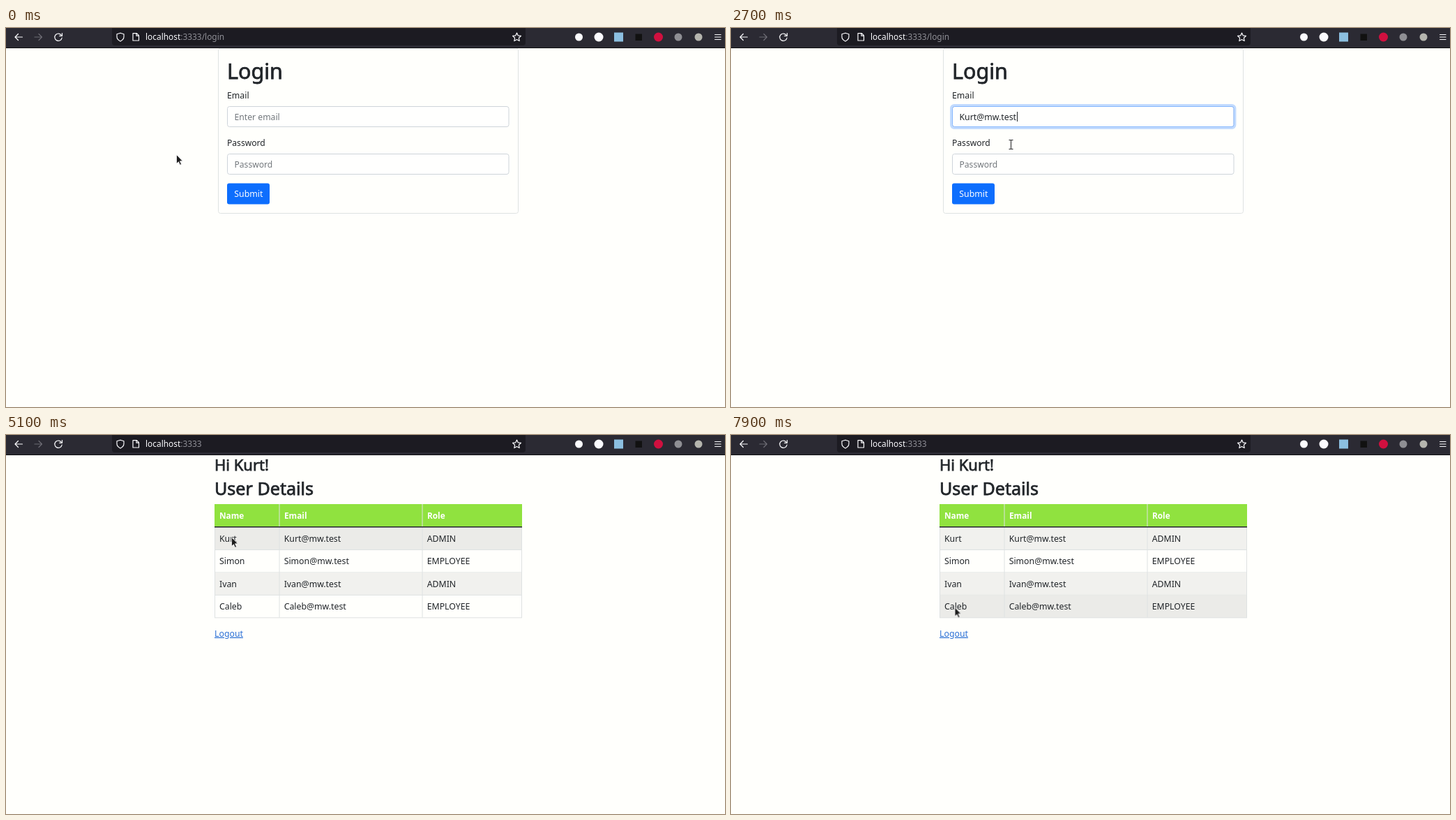
Recreate the animation shown at these times as an HTML page. Size 1031x543 px, loop 8 s.

```html
<!DOCTYPE html>
<html lang="en">
<head>
<meta charset="utf-8">
<title>Login demo</title>
<style>
html, body { margin: 0; width: 100%; height: 100%; overflow: hidden; background: #fffffc; }
svg { display: block; width: 1031px; height: 543px; font: 12.3px "Noto Sans", "Open Sans", sans-serif; fill: #212529; }
.icon { fill: none; stroke: #fbfbfe; stroke-width: 1.2; stroke-linecap: round; stroke-linejoin: round; }
.heading { stroke: #212529; stroke-width: .75; }
.hint { fill: #72777c; }
.field { fill: #fffffe; stroke: #ced4da; }
.filled { fill: #fdf9c8; stroke: #e4dfb8; }
.ring { fill: none; stroke: #c2dbfe; stroke-width: 3.4; }
.edge { fill: none; stroke: #86b7fe; }
.line { fill: none; stroke: #dee2e2; }
.th { fill: #fff; font-weight: 700; font-size: 11.8px; }
.link { fill: #2b70d6; text-decoration: underline; }

/* One 8 s clock; every change is a hard step. */
.t { opacity: 0; animation: 8s step-end infinite; }
#login, #path { animation-name: login; }
#home { animation-name: home; }
#empty { animation-name: empty; }
#data { animation-name: data; }
#focus { animation-name: focus; }
#menu, #caret1 { animation-name: menu; }
#pick { animation-name: pick; }
#hint1 { animation-name: hint1; }
#email { animation-name: email; }
#caret2 { animation-name: caret2; }
#hint2 { animation-name: hint2; }
#auto1, #auto2 { animation-name: auto; }
#press { animation-name: press; }
#press2 { animation-name: press2; }
#arrow { animation-name: arrow; }
#beam { animation-name: beam; }
#hand { animation-name: hand; }
#row0 { animation-name: row0; }
#row1 { animation-name: row1; }
#row2 { animation-name: row2; }
#row3 { animation-name: row3; }
#pointer { animation: move 8s step-end infinite; }

@keyframes login { 0% { opacity: 1 } 50%, 100% { opacity: 0 } }
@keyframes home { 0% { opacity: 0 } 50%, 100% { opacity: 1 } }
@keyframes empty { 0% { opacity: 1 } 53.75%, 100% { opacity: 0 } }
@keyframes data { 0% { opacity: 0 } 53.75%, 100% { opacity: 1 } }
@keyframes focus { 0% { opacity: 0 } 17.5% { opacity: .5 } 18.75% { opacity: 1 } 48.75%, 100% { opacity: 0 } }
@keyframes menu { 0% { opacity: 0 } 18.75% { opacity: 1 } 33.75%, 100% { opacity: 0 } }
@keyframes pick { 0% { opacity: 0 } 30% { opacity: 1 } 33.75%, 100% { opacity: 0 } }
@keyframes hint1 { 0% { opacity: 1 } 33.75%, 100% { opacity: 0 } }
@keyframes email { 0% { opacity: 0 } 33.75%, 100% { opacity: 1 } }
@keyframes caret2 { 0% { opacity: 0 } 33.75% { opacity: 1 } 36.25%, 100% { opacity: 0 } }
@keyframes hint2 { 0% { opacity: 1 } 36.25%, 100% { opacity: 0 } }
@keyframes auto { 0% { opacity: 0 } 36.25%, 100% { opacity: 1 } }
@keyframes press { 0% { opacity: 0 } 45% { opacity: .5 } 46.25%, 100% { opacity: 1 } }
@keyframes press2 { 0% { opacity: 0 } 48.75%, 100% { opacity: 1 } }
@keyframes arrow { 0% { opacity: 1 } 33.75% { opacity: 0 } 50%, 100% { opacity: 1 } }
@keyframes beam { 0% { opacity: 0 } 33.75% { opacity: 1 } 45%, 100% { opacity: 0 } }
@keyframes hand { 0% { opacity: 0 } 45% { opacity: 1 } 50%, 100% { opacity: 0 } }
@keyframes row0 {
  0%, 66.25%, 71.25%, 82.5%, 95%, 100% { opacity: 0 }
  61.25%, 68.75%, 81.25%, 93.75% { opacity: 1 }
}
@keyframes row1 { 0%, 72.5%, 81.25%, 96.25%, 100% { opacity: 0 } 71.25%, 80%, 95% { opacity: 1 } }
@keyframes row2 { 0%, 73.75%, 80%, 100% { opacity: 0 } 72.5%, 77.5% { opacity: 1 } }
@keyframes row3 { 0%, 75%, 77.5% { opacity: 0 } 73.75%, 76.25%, 96.25%, 100% { opacity: 1 } }
@keyframes move {
  0% { transform: translate(244px, 181px) }
  12.5% { transform: translate(320px, 161px) }
  13.75% { transform: translate(320px, 161px); animation-timing-function: steps(2) }
  16.25% { transform: translate(387.5px, 125.5px) }
  27.5% { transform: translate(387.5px, 125.5px); animation-timing-function: steps(3) }
  31.25% { transform: translate(396px, 166px) }
  33.75% { transform: translate(401.5px, 167px) }
  35% { transform: translate(401.5px, 167px); animation-timing-function: steps(9) }
  46.25% { transform: translate(352px, 234px) }
  52.5% { transform: translate(352px, 234px); animation-timing-function: steps(2) }
  55% { transform: translate(272px, 229px) }
  58.75% { transform: translate(254px, 223px) }
  61.25% { transform: translate(320px, 163px) }
  63.75% { transform: translate(323px, 146px) }
  65% { transform: translate(323px, 146px); animation-timing-function: steps(2) }
  67.5% { transform: translate(326px, 106px); animation-timing-function: steps(6) }
  75% { transform: translate(335.5px, 261px) }
  76.25% { transform: translate(335px, 252px); animation-timing-function: steps(7) }
  85% { transform: translate(337px, 82px) }
  86.25% { transform: translate(337px, 82px); animation-timing-function: steps(2) }
  88.75% { transform: translate(368px, 33px) }
  90% { transform: translate(368px, 33px); animation-timing-function: steps(5) }
  96.25% { transform: translate(331px, 229px) }
  98.75%, 100% { transform: translate(320.5px, 246.5px) }
}
</style>
</head>
<body>
<svg viewBox="0 0 1031 543">
  <g id="login" class="t">
    <rect class="line" x="304.5" y="29" width="430" height="236.5" rx="3"/>
    <text class="heading" x="317" y="73" font-size="30.5">Login</text>
    <text x="317" y="101">Email</text>
    <rect class="field" x="317.5" y="112.5" width="403.5" height="29" rx="3"/>
    <rect id="auto1" class="t filled" x="317.5" y="112.5" width="403.5" height="29" rx="3"/>
    <g id="focus" class="t">
      <rect class="ring" x="315.7" y="110.7" width="407" height="32.6" rx="4.5"/>
      <rect class="edge" x="317.5" y="112.5" width="403.5" height="29" rx="3"/>
    </g>
    <text id="hint1" class="t hint" x="327.5" y="131.5" font-size="12.2">Enter email</text>
    <path id="caret1" class="t" d="M327 120h1v14h-1z"/>
    <text id="email" class="t" x="327.5" y="131.5">Kurt@mw.test</text>
    <path id="caret2" class="t" d="M410 120h1v14h-1z"/>
    <text x="317" y="168.5" font-size="12.1">Password</text>
    <rect class="field" x="317.5" y="180.5" width="403.5" height="29" rx="3"/>
    <text id="hint2" class="t hint" x="327.5" y="199.5" font-size="12.1">Password</text>
    <g id="auto2" class="t">
      <rect class="filled" x="317.5" y="180.5" width="403.5" height="29" rx="3"/>
      <path d="M330.2 195h20" fill="none" stroke="#212529" stroke-width="3.8" stroke-linecap="round" stroke-dasharray="0 4.6"/>
    </g>
    <rect id="press2" class="t ring" x="315.7" y="221" width="64" height="33" rx="4.5"/>
    <rect x="317" y="222.5" width="61" height="30" rx="3" fill="#0d6efd"/>
    <rect id="press" class="t" x="317" y="222.5" width="61" height="30" rx="3" fill="#0b5ed7"/>
    <text x="327.3" y="242" fill="#fff">Submit</text>
    <g id="menu" class="t">
      <rect x="317" y="142" width="404.5" height="174" fill="#282825"/>
      <rect x="318.5" y="142" width="401.5" height="140" fill="#33332f"/>
      <rect id="pick" class="t" x="318.5" y="143" width="401.5" height="34.5" fill="#5f5f5b"/>
      <g id="saved"></g>
      <rect x="318.5" y="282.5" width="401.5" height="31.5" fill="#676763"/>
      <text x="519" y="303" font-size="11.15" text-anchor="middle" fill="#fbfbfe">View Saved Logins</text>
    </g>
  </g>

  <g id="home" class="t">
    <text class="heading" x="299" y="50.5" font-size="22">Hi Kurt!</text>
    <text class="heading" x="299" y="85.5" font-size="25.1">User Details</text>
    <g id="empty" class="t"></g>
    <g id="data" class="t"></g>
  </g>

  <rect width="1031" height="29" fill="#0f0f12"/>
  <rect width="1031" height="28" fill="#2b2a33"/>
  <path d="M152 0h593v21q0 4-4 4H156q-4 0-4-4z" fill="#1c1b22"/>
  <g class="icon">
    <path d="M23.5 13H13M17.5 8.5 13 13l4.5 4.5"/>
    <path d="M41 13h10.5M47 8.5l4.5 4.5-4.5 4.5" stroke="#6d6c74"/>
    <path d="M79.5 10.5a5.2 5.2 0 1 0 .7 3.5M80.5 7.5v3.8h-3.8"/>
    <path d="M164 7.2l5 1.6v3.7q0 4-5 6.5-5-2.5-5-6.5V8.8z"/>
    <path d="M182 7.7h5.5l3 3V18H182zM187 8v3.2h3.3"/>
    <path d="M732.5 7l1.8 3.9 4.2.5-3.1 2.9.8 4.2-3.7-2.1-3.7 2.1.8-4.2-3.1-2.9 4.2-.5z"/>
    <path d="M1016.5 9.5h8.5M1016.5 13h8.5M1016.5 16.5h8.5"/>
  </g>
  <circle cx="821.5" cy="13" r="5.5" fill="#fbfbfe"/>
  <circle cx="850" cy="13" r="6.5" fill="#fbfbfe"/>
  <rect x="872" y="6.5" width="13" height="13" fill="#8cbfe0"/>
  <rect x="902.5" y="8.5" width="9.5" height="9.5" fill="#111"/>
  <circle cx="935.5" cy="13" r="6.5" fill="#d0103f"/>
  <circle cx="964" cy="13" r="5.5" fill="#8f8f94"/>
  <circle cx="993" cy="13" r="5.5" fill="#b5b5ae"/>
  <text x="200" y="17.3" font-size="11.9" fill="#fbfbfe">localhost<tspan fill="#8f8f96">:3333</tspan></text>
  <text id="path" class="t" x="280.7" y="17.3" font-size="11.9" fill="#8f8f96">/login</text>

  <g id="pointer">
    <path id="arrow" class="t" d="M.5.5V13.5L3.4 10.7 5.5 15.3 7.6 14.3 5.5 9.8H9.4Z" fill="#1c1c1c" stroke="#fff" stroke-width=".8"/>
    <g id="beam" class="t" fill="none">
      <path d="M-3-6.5H-1L0-6 1-6.5H3M0-6V6M-3 6.5H-1L0 6 1 6.5H3" stroke="#fff" stroke-width="2.6"/>
      <path d="M-3-6.5H-1L0-6 1-6.5H3M0-6V6M-3 6.5H-1L0 6 1 6.5H3" stroke="#222" stroke-width="1.2"/>
    </g>
    <path id="hand" class="t" d="M-1.4 7.5V.8Q0-1 1.4.8V4.5L6 5.3Q7.5 5.8 7.5 7.5V9.5Q7.3 12 6 13.7H-.5Q-2.5 10.5-4 8.5-3.3 6.3-1.4 7.5Z" fill="#fff" stroke="#222"/>
  </g>
</svg>
<script>
const users = [["Kurt", "ADMIN"], ["Simon", "EMPLOYEE"], ["Ivan", "ADMIN"], ["Caleb", "EMPLOYEE"]];
const mail = name => name + "@mw.test";
const fill = (id, html) => document.getElementById(id).innerHTML = html;
const text = (x, y, s, attrs = "") => `<text x="${x}" y="${y}" ${attrs}>${s}</text>`;
const rect = (y, h, attrs) => `<rect x="299" y="${y}" width="441" height="${h}" ${attrs}/>`;
const rowH = 32.45, bodyTop = 132;

const saved = ([name], i) => {
  const y = 158 + i * 34.7;
  return `<path class="icon" style="stroke:#b5b5b0;stroke-width:1.1" d="M329 ${y - 5}a2.7 2.7 0 1 0-5.4 0a2.7 2.7 0 1 0 5.4 0h6v2.5M332.5 ${y - 5}v2"/>`
    + text(338.3, y, mail(name), 'font-size="11.5" fill="#fbfbfe"')
    + text(338.3, y + 15, "From this website", 'font-size="11.3" fill="#a9a9a5"');
};

const row = ([name, role], i) => {
  const y = bodyTop + i * rowH;
  return (i % 2 ? "" : rect(y, rowH, 'fill="#f1f1ee"'))
    + rect(y, rowH, `id="row${i}" class="t" fill="#ebebe8"`)
    + text(306, y + 21, name) + text(398.7, y + 21, mail(name)) + text(603.7, y + 21, role)
    + `<path class="line" d="M299 ${y + rowH}h441"/>`;
};

// Header, rows, column lines and the link below
const table = (c2, c3, list) => {
  const end = bodyTop + list.length * rowH;
  return rect(99, 33, 'fill="#90e23f"')
    + text(306, 120, "Name", 'class="th"') + text(c2 + 7, 120, "Email", 'class="th"') + text(c3 + 7, 120, "Role", 'class="th"')
    + list.map(row).join("")
    + `<path class="line" d="M${c2} 99V${end}M${c3} 99V${end}M299.5 ${bodyTop}V${end}M739.5 ${bodyTop}V${end}"/>`
    + rect(131, 1.5, 'fill="#212529"')
    + text(299, end + 27, "Logout", 'class="link"');
};

fill("saved", users.map(saved).join(""));
fill("empty", table(457, 608, []));
fill("data", table(392, 597, users));
</script>
</body>
</html>
```
